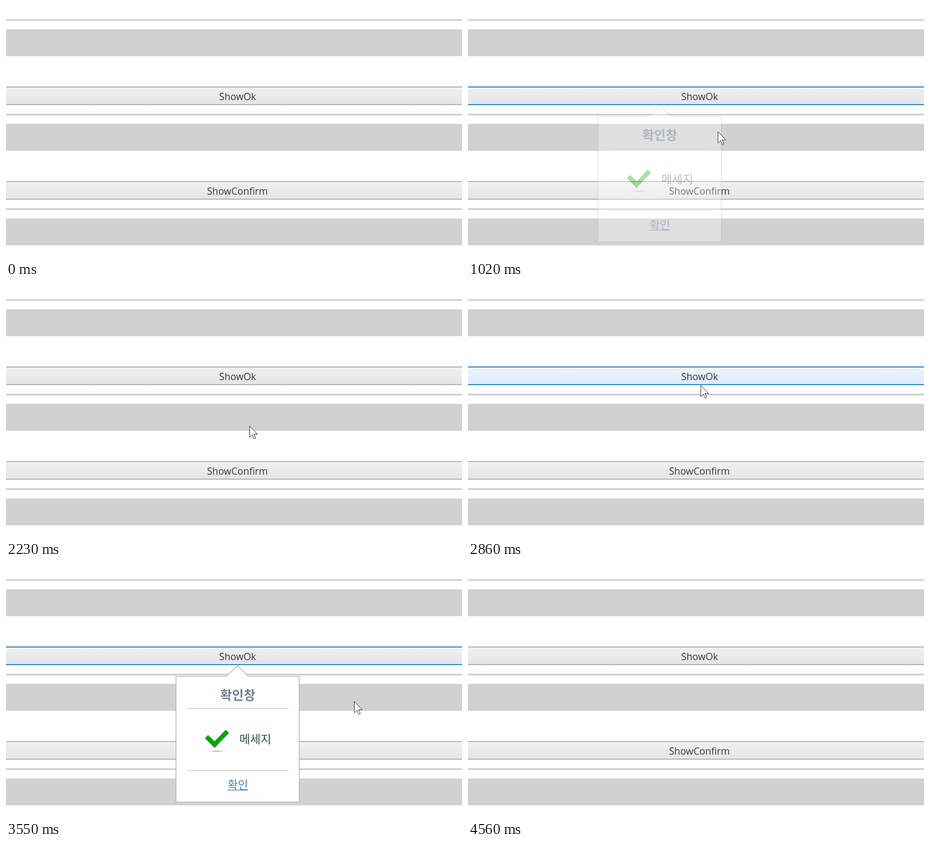
An HTML page for the animation above (5040 ms loop, 1006 px wide and 557 px high).

```html
<!DOCTYPE html>
<html lang="ko">
<head>
<meta charset="utf-8">
<title>Confirm popup</title>
<style>
  html, body { margin: 0; width: 100%; height: 100%; overflow: hidden; background: #fff; }
  svg { display: block; width: 100%; height: 100%; }
  text { text-anchor: middle; }
  .label { font: 21.3px "Open Sans", "Noto Sans", sans-serif; fill: #383838; }
  .ko { font-family: "Noto Sans CJK KR", "Noto Sans CJK", sans-serif; }
  .cursor { fill: #fff; stroke: #111; stroke-linejoin: round; }
</style>
</head>
<body>
<svg viewBox="0 0 1006 557">
  <defs>
    <linearGradient id="normal" x2="0" y2="1"><stop stop-color="#f0f0f0"/><stop offset="1" stop-color="#e5e5e5"/></linearGradient>
    <linearGradient id="hover" x2="0" y2="1"><stop stop-color="#ecf4fc"/><stop offset="1" stop-color="#dcebfc"/></linearGradient>
    <linearGradient id="pressed" x2="0" y2="1"><stop stop-color="#daecfc"/><stop offset="1" stop-color="#c4dffc"/></linearGradient>
    <radialGradient id="shade"><stop stop-color="#8c979c"/><stop offset="1" stop-color="#fff" stop-opacity="0"/></radialGradient>
  </defs>
  <g id="bands" fill="#d1d1d1"></g>
  <g stroke-width="2">
    <rect id="ok" x="-5" y="179" width="1016" height="39"/>
    <rect id="confirm" x="-5" y="388" width="1016" height="39"/>
  </g>
  <text class="label" x="511" y="208">ShowOk</text>
  <text class="label" x="510.5" y="417">ShowConfirm</text>
  <g id="popup">
    <path d="M375 244H486.5L510.7 220.5 535 244H647V521.5H375Z" fill="#fff" stroke="#b6b6b6" stroke-width="1.7"/>
    <path d="M399 314.7H623M399 451.8H623" stroke="#c6c6c6" stroke-width="1.5"/>
    <text class="ko" x="511.5" y="295.5" font-size="28" font-weight="700" fill="#708090">확인창</text>
    <ellipse cx="465" cy="409.3" rx="27" ry="3" fill="url(#shade)"/>
    <path d="M438.7 380.5L446 373.5 460 387.5 484.7 362 492 369 460 402.3Z" fill="#00a606"/>
    <text class="ko" x="550" y="392" font-size="25.5" font-weight="300" fill="#2f4f4f">메세지</text>
    <g id="link">
      <text class="ko" x="511.5" y="492.8" font-size="24.5">확인</text>
      <rect x="489" y="494.5" width="45" height="1.5"/>
    </g>
  </g>
  <path id="arrow" class="cursor" d="M.5 .5V25.5L6.3 20 10.3 28.8 13.7 27.3 9.8 18.6H17.8Z"/>
  <g id="hand" class="cursor">
    <path d="M-2 20V2.5a2.3 2.5 0 0 1 4.6 0V12q0-3 2.3-2.8t2.3 3q0-2.4 2.3-2.2t2.3 3q0-2 2.3-1.8t2.2 3V22q0 12-9 12h-3.5q-4 0-6.5-5l-6-10q-1.5-3.3 1-3.7t5.8 4Z"/>
    <path d="M2.6 11v6M7.2 12v5M11.8 13v4" fill="none"/>
  </g>
</svg>
<script>
const LOOP = 5040, ENTER = 70, LEAVE = 4560;
const REFRESH = 77, SLIDE = 400, FADE = 165;
const $ = id => document.getElementById(id);
const set = (id, attrs) => Object.entries(attrs).forEach(([k, v]) => $(id).setAttribute(k, v));
const clamp = v => Math.max(0, Math.min(1, v));
const progress = (t, from, to) => clamp((t - from) / (to - from));
const glide = p => p * (3 - p) / 2;

const clicks = [
  { press: 710, open: 860, close: 1690 },
  { press: 2950, open: 3010, close: 3930 }
];
const moves = [
  { from: ENTER, to: 378, x: 567, y: 199 },
  { from: 860, to: 1530, x: 510, y: 479.5 },
  { from: 1930, to: 2226, x: 537, y: 309 },
  { from: 2226, to: 2780, x: 513, y: 219 },
  { from: 3160, to: 3535, x: 768, y: 299 },
  { from: 3535, to: 3766, x: 488, y: 463 },
  { from: 4090, to: 4250, x: 810, y: 336 },
  { from: 4250, to: LEAVE, x: 930, y: 565 }
];

for (let y = 29; y < 557; y += 209) {
  $('bands').innerHTML += `<rect y="${y}" width="1006" height="4"/>
    <rect y="${y + 22.5}" width="1006" height="59.5"/>`;
}

function pointer(t) {
  let x = 795, y = 542;
  for (const move of moves) {
    const p = glide(progress(t, move.from, move.to));
    x += (move.x - x) * p;
    y += (move.y - y) * p;
  }
  return { x, y };
}

function paintButton(id, fill, active) {
  set(id, { fill: `url(#${fill})`, stroke: active ? '#1c78c0' : '#acacac' });
}

function draw(t) {
  // Motion is seen at the screen's refresh rate
  const seen = ENTER + Math.floor((t - ENTER) / REFRESH) * REFRESH;
  const { x, y } = pointer(seen);
  const shown = t >= ENTER && t < LEAVE;
  const popup = clicks.find(c => t >= c.open && t < c.close + FADE);
  const over = (top, bottom) => shown && !popup && y >= top && y <= bottom;
  const pressed = clicks.some(c => t >= c.press && t < c.open);
  const okHover = over(178, 220), confirmHover = over(387, 428);

  paintButton('ok', pressed ? 'pressed' : okHover ? 'hover' : 'normal',
    okHover || (popup && t < popup.close));
  paintButton('confirm', confirmHover ? 'hover' : 'normal', confirmHover);

  const entry = popup ? progress(seen, popup.open, popup.open + SLIDE) : 0;
  const exit = popup ? progress(seen, popup.close, popup.close + FADE) : 0;
  set('popup', {
    opacity: entry * (1 - exit),
    transform: `translate(${-300 * (1 - entry) ** 3})`
  });

  const onLink = !!popup && Math.abs(x - 511) < 24 && y > 462 && y < 500;
  set('link', { fill: onLink ? '#ffa500' : '#4682b4', 'font-weight': onLink ? 700 : 300 });

  const transform = `translate(${x} ${y})`;
  set('arrow', { transform, visibility: shown && !onLink ? 'visible' : 'hidden' });
  set('hand', { transform, visibility: shown && onLink ? 'visible' : 'hidden' });
}

const start = performance.now();
function tick() {
  draw((performance.now() - start) % LOOP);
  requestAnimationFrame(tick);
}
tick();
</script>
</body>
</html>
```
